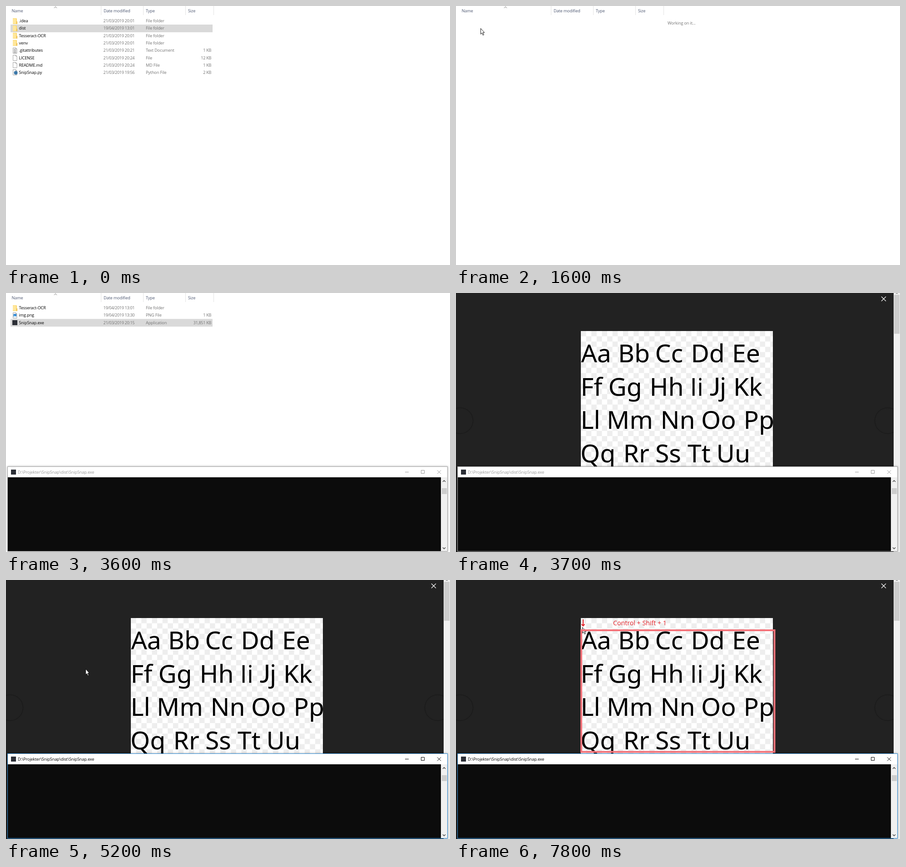
Write an HTML page that moves like this. It is 978 px wide and 572 px high and loops after 8000 ms.

```html
<!DOCTYPE html>
<html lang="en">
<head>
<meta charset="utf-8">
<title>File list and screen capture</title>
<style>
html, body { margin: 0; width: 100%; height: 100%; overflow: hidden; background: #fff; }
svg { display: block; width: 978px; height: 572px; }
text { font: 9.1px "Open Sans", sans-serif; letter-spacing: -.12px; white-space: pre; }
.dim { fill: #737373; }
.date { letter-spacing: -.32px; }
.head { fill: #4c5670; }
.big { font: 55.3px "Noto Sans", sans-serif; letter-spacing: 0; }
.plain { font-family: "Open Sans", sans-serif; }
.hook { font-family: Lato, sans-serif; }
.keys { font-size: 14.2px; letter-spacing: 0; fill: #e3242b; }

/* One 8 s loop: 1% is 80 ms. Every change is a hard cut. */
.anim { animation: 8s step-end infinite; }
#before { animation-name: before; }
#busy { animation-name: busy; }
#after { animation-name: after; }
#picked { animation-name: picked; }
#chosen { animation-name: chosen; }
#hover { animation-name: hover; }
#console { animation-name: console; filter: drop-shadow(0 0 2px rgba(0,0,0,.35)); }
#viewer { animation-name: viewer; }
#note { animation-name: note; }
#cursor { animation-name: cursor; }
.edge { animation-name: edge; }
.ink { animation-name: ink; }

@keyframes before { 0% { visibility: visible } 20%, 100% { visibility: hidden } }
@keyframes busy { 0% { visibility: hidden } 20% { visibility: visible } 21.25%, 100% { visibility: hidden } }
@keyframes after { 0% { visibility: hidden } 21.25%, 100% { visibility: visible } }
@keyframes console { 0% { visibility: hidden } 36.25%, 100% { visibility: visible } }
@keyframes viewer { 0% { visibility: hidden } 46.25%, 100% { visibility: visible } }
@keyframes note { 0% { opacity: 0 } 96.25% { opacity: .5 } 97.5%, 100% { opacity: 1 } }
@keyframes picked {
  0% { fill: #d9d9d9; stroke: #d9d9d9 }
  7.5%, 100% { fill: #cce8ff; stroke: #99d1ff }
}
@keyframes chosen {
  0% { opacity: 0; fill: #cce8ff; stroke: #99d1ff }
  33.75% { opacity: 1; fill: #cce8ff; stroke: #99d1ff }
  36.25%, 100% { opacity: 1; fill: #d9d9d9; stroke: #d9d9d9 }
}
@keyframes hover {
  0% { opacity: 0; transform: none }
  2.5% { opacity: 1; transform: translateY(65px) }
  3.75% { opacity: 1; transform: translateY(97.5px) }
  5% { opacity: 1; transform: translateY(81.5px) }
  6.25% { opacity: 1; transform: translateY(32.5px) }
  7.5% { opacity: 0; transform: none }
  21.25% { opacity: 1; transform: translateY(16px) }
  28.75% { opacity: 1; transform: translateY(32.5px) }
  30% { opacity: 0; transform: none }
  32.5% { opacity: 1; transform: translateY(32.5px) }
  33.75%, 100% { opacity: 0; transform: none }
}
@keyframes edge { 0% { stroke: #2b8bd8 } 45% { stroke: #a6a6a6 } 52.5%, 100% { stroke: #2b8bd8 } }
@keyframes ink { 0% { color: #000 } 45% { color: #999 } 52.5%, 100% { color: #000 } }
@keyframes cursor {
  0% { visibility: hidden; transform: none }
  1.25% { visibility: visible; transform: translate(96px, 0) }
  2.5% { transform: translate(40px, 92px) }
  3.75% { transform: translate(8px, 135px) }
  5% { transform: translate(22px, 110px) }
  6.25% { transform: translate(44px, 66px) }
  7.5% { transform: translate(54px, 49px) }
  28.75% { transform: translate(56px, 59px) }
  30% { transform: translate(62px, 78px) }
  31.25% { transform: translate(68px, 86px) }
  32.5% { transform: translate(70px, 72px) }
  33.75% { visibility: visible; transform: translate(70px, 62px) }
  36.25% { visibility: hidden; transform: translate(70px, 62px) }
  57.5% { visibility: visible; transform: translate(937px, 240px) }
  58.75% { transform: translate(394px, 178px) }
  61.25% { transform: translate(330px, 168px) }
  62.5% { transform: translate(256px, 182px) }
  63.75% { transform: translate(203px, 193px) }
  65% { transform: translate(175px, 196px) }
  67.5% { transform: translate(174px, 196px) }
  70% { transform: translate(259px, 198px) }
  75% { transform: translate(280px, 198px) }
  76.25% { transform: translate(291px, 198px) }
  85% { transform: translate(297px, 192px) }
  86.25% { transform: translate(311px, 182px) }
  87.5% { transform: translate(328px, 170px) }
  88.75% { transform: translate(342px, 158px) }
  90% { transform: translate(338px, 146px) }
  91.25% { transform: translate(322px, 134px) }
  92.5% { transform: translate(304px, 122px) }
  93.75% { transform: translate(288px, 113px) }
  95% { transform: translate(278px, 108px) }
  96.25%, 100% { visibility: visible; transform: translate(278px, 104px) }
}
</style>
</head>
<body>
<svg viewBox="0 0 978 572">
  <defs>
    <pattern id="checks" x="275" y="84" width="23.2" height="23.2" patternUnits="userSpaceOnUse">
      <path fill="#eee" d="M0 0h23.2v23.2H0z"/>
      <path fill="#fff" d="M11.6 0h11.6v11.6H11.6zM0 11.6h11.6v11.6H0z"/>
    </pattern>
    <g id="folder">
      <path fill="#fbd974" d="M1 0h8l1 1v12H1z"/>
      <path fill="#ffe79c" d="M1 1h7v11H1z"/>
      <path fill="#eec25a" d="M9 7h2v6H9z"/>
    </g>
    <path id="page" fill="#fff" stroke="#8c8c8c" stroke-width=".8" d="M1.5.5h6l2.500 2.500v9.500h-8.500zM7.500.5v2.500h2.500"/>
    <g id="doc">
      <use href="#page"/>
      <path stroke="#777" stroke-width=".8" d="M3 3.500h4M3 5.500h5.500M3 7.500h5.500M3 9.500h5.500M3 11.200h5.500"/>
    </g>
    <g id="image">
      <use href="#page"/>
      <path fill="#1f7fd0" d="M2.500 3.500h6.500v6.500H2.500z"/>
      <path fill="#bfe2fa" d="M2.500 9l2-2.500 1.500 1.500 1-1 2 2v1H2.500z"/>
    </g>
    <g id="script">
      <use href="#page"/>
      <circle cx="7.500" cy="7.500" r="4" fill="#3b77a8"/>
    </g>
    <path id="app" fill="#2c2f36" d="M0 1h11v11H0z"/>
  </defs>

  <g id="columns">
    <path fill="none" stroke="#e3e3e3" d="M209.500 0v20M302.500 0v20M395.500 0v20M457.500 0v20"/>
    <path fill="none" stroke="#707070" d="M106 4.500l3-3 3 3"/>
  </g>
  <rect id="hover" class="anim" x="10" y="25" width="445" height="16.300" fill="#e5f3ff"/>
  <g id="before" class="anim">
    <rect id="picked" class="anim" x="10.500" y="41.500" width="444" height="16"/>
  </g>
  <text id="busy" class="anim dim" x="466" y="41.200">Working on it...</text>
  <g id="after" class="anim">
    <rect id="chosen" class="anim" x="10.500" y="57.800" width="444" height="16"/>
  </g>

  <g id="viewer" class="anim">
    <path fill="#222" d="M0 0h978v572H0z"/>
    <g fill="none" stroke="#1c1c1c" stroke-width="2">
      <circle cx="9" cy="282" r="28.500"/>
      <circle cx="951" cy="282" r="28.500"/>
    </g>
    <path fill="none" stroke="#fff" stroke-width="1.200" d="M937 8l10 10M947 8l-10 10"/>
    <path fill="#f0f0f0" d="M964 0h14v572h-14z"/>
    <path fill="#cdcdcd" d="M965 4h12v86h-12z"/>
    <path fill="none" stroke="#555" d="M969 1.500l2-1.500 2 1.500"/>
    <path fill="url(#checks)" d="M275 84h423v300H275z"/>
    <g id="letters"></g>
  </g>

  <g id="console" class="anim">
    <path fill="#fff" d="M3 383h970v188H3z"/>
    <path fill="#0c0c0c" d="M4 407h954v163H4z"/>
    <path fill="#f0f0f0" d="M958 407h14v163h-14z"/>
    <path fill="#cdcdcd" d="M960 431h11v13h-11z"/>
    <path fill="none" stroke="#404040" stroke-width="1.400" d="M962 417l3-3 3 3M962 562l3 3 3-3"/>
    <rect class="anim edge" x="3.500" y="383.500" width="969" height="187" fill="none"/>
    <use href="#app" x="11" y="389"/>
    <g class="anim ink">
      <text x="26" y="399.200" fill="currentColor">D:\Projekter\SnipSnap\dist\SnipSnap.exe</text>
      <path fill="none" stroke="currentColor" d="M879 395.500h8M914.500 391.500h7v7h-7zM950 391.500l8 8M958 391.500l-8 8"/>
    </g>
  </g>

  <path id="cursor" class="anim" fill="#fff" stroke="#000" stroke-width=".9" d="M.4.5v12.700l2.800-2.700 2.100 5 2-.9-2.100-4.800h3.600z"/>

  <g id="note" class="anim">
    <rect x="276" y="111" width="425.500" height="268.500" fill="none" stroke="#f4737a" stroke-width="4"/>
    <path fill="none" stroke="#e3242b" stroke-width="2" d="M280 87v14M276.500 97.500l3.500 4 3.500-4"/>
    <text class="keys" x="346" y="100">Control + Shift + 1</text>
  </g>
</svg>
<script>
const byId = id => document.getElementById(id);

function add(parent, tag, attrs, content = '') {
  const el = document.createElementNS('http://www.w3.org/2000/svg', tag);
  for (const key in attrs) el.setAttribute(key, attrs[key]);
  el.textContent = content;
  parent.append(el);
}

function addRows(parent, rows) {
  rows.forEach(([icon, name, date, type, size], i) => {
    const mid = 33 + 16.28 * i, y = mid + 3.2;
    add(parent, 'use', { href: '#' + icon, x: 14, y: Math.round(mid - 6.5) });
    add(parent, 'text', { x: 28.5, y }, name);
    add(parent, 'text', { x: 214.5, y, class: 'dim date' }, date);
    add(parent, 'text', { x: 308, y, class: 'dim' }, type);
    if (size) add(parent, 'text', { x: 452, y, class: 'dim date', 'text-anchor': 'end' }, size + ' KB');
  });
}

[['Name', 12.5], ['Date modified', 215], ['Type', 308], ['Size', 401]]
  .forEach(([label, x]) => add(byId('columns'), 'text', { x, y: 13.8, class: 'head' }, label));

addRows(byId('before'), [
  ['folder', '.idea', '21/03/2019 20:01', 'File folder'],
  ['folder', 'dist', '19/04/2019 13:01', 'File folder'],
  ['folder', 'Tesseract-OCR', '21/03/2019 20:01', 'File folder'],
  ['folder', 'venv', '21/03/2019 20:01', 'File folder'],
  ['doc', '.gitattributes', '21/03/2019 20:21', 'Text Document', '1'],
  ['page', 'LICENSE', '21/03/2019 20:24', 'File', '12'],
  ['page', 'README.md', '21/03/2019 20:24', 'MD File', '1'],
  ['script', 'SnipSnap.py', '21/03/2019 19:56', 'Python File', '2']
]);
addRows(byId('after'), [
  ['folder', 'Tesseract-OCR', '19/04/2019 13:01', 'File folder'],
  ['image', 'img.png', '19/04/2019 13:30', 'PNG File', '1'],
  ['app', 'SnipSnap.exe', '21/03/2019 20:15', 'Application', '31,851']
]);

// Each line: letter groups with their pen position, and an optional style.
[
  [['Aa', 275.5], ['Bb', 357], ['Cc', 438.5], ['Dd', 517.5], ['Ee', 608]],
  [['Ff', 274.5], ['Gg', 335.5], ['Hh', 426.5], ['Ii', 515.5, 'plain'], ['J', 559, 'hook'], ['j', 581], ['Kk', 611]],
  [['Ll', 274.5], ['Mm', 332], ['Nn', 450.5], ['Oo', 540], ['Pp', 633.5]],
  [['Qq', 274], ['Rr', 368.5], ['Ss', 439], ['Tt', 510], ['Uu', 573.5]]
].forEach((line, i) => line.forEach(([pair, x, style = '']) =>
  add(byId('letters'), 'text', { x, y: 153 + 73.6 * i, class: 'big ' + style }, pair)));
</script>
</body>
</html>
```
